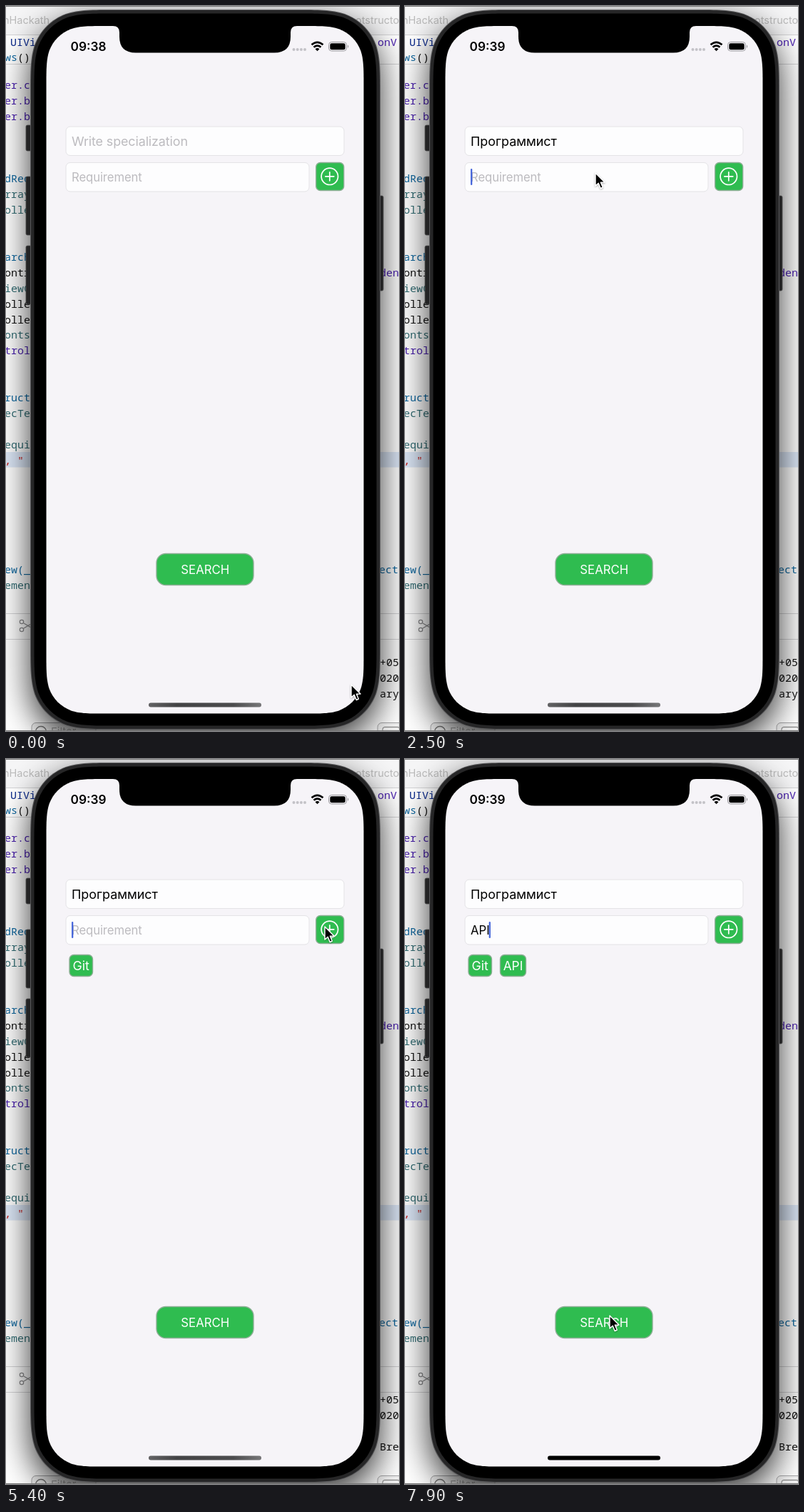
Write an HTML page that moves like this. It is 551x1016 px and loops after 8000 ms.

```html
<!DOCTYPE html>
<html lang="en">
<head>
<meta charset="utf-8">
<title>Phone form demo</title>
<style>
  html, body { margin: 0; width: 100%; height: 100%; overflow: hidden; background: #fff; }
  svg { display: block; width: 551px; height: 1016px; font: 17px Inter, "Noto Sans", sans-serif; }
  text { white-space: pre; }
  .code { font: 500 15px "Noto Sans Mono", "DejaVu Sans Mono", monospace; }
  .hint { fill: #bcbbbf; letter-spacing: -.1px; }
  .field { fill: #fdfdfe; stroke: #e4e3e6; }
  .green { fill: #2fbc50; stroke: #8cae94; stroke-width: 1.4; }
  .white { fill: #fff; }
  .mid { text-anchor: middle; }
  .rule { stroke: #d4d4d6; fill: none; }
  .line { fill: none; stroke-linecap: round; }
</style>
</head>
<body>
<svg viewBox="0 0 551 1016">
  <defs>
    <filter id="blur" x="-30%" y="-30%" width="160%" height="160%"><feGaussianBlur stdDeviation="24"/></filter>
    <filter id="soft" x="-20%" y="-120%" width="140%" height="360%">
      <feDropShadow dx="0" dy="5" stdDeviation="14" flood-opacity=".26"/>
    </filter>
    <filter id="drop" x="-50%" y="-50%" width="200%" height="200%">
      <feDropShadow dx="0" dy="1" stdDeviation="1" flood-opacity=".35"/>
    </filter>
    <linearGradient id="bar"><stop stop-color="#636365"/><stop offset=".25" stop-color="#434345"/>
      <stop offset=".75" stop-color="#4c4c4e"/><stop offset="1" stop-color="#777779"/></linearGradient>
  </defs>

  <!-- editor window -->
  <rect width="551" height="1016" fill="#fff"/>
  <rect width="551" height="40" fill="#f5f5f6"/>
  <rect y="625" width="551" height="21.5" fill="#dde8f8"/>
  <path class="rule" d="M0 40.5H551M0 81.5H551M0 851.5H551M0 887.5H551"/>
  <g fill="none" stroke="#8b8b8d" stroke-width="1.2">
    <circle cx="22" cy="863" r="2.7"/><circle cx="22" cy="874" r="2.7"/>
    <path d="M25 865L35 871M25 872L35 866"/>
  </g>
  <g id="code" class="code"></g>
  <g id="log" class="code"></g>
  <g fill="#f2f2f2" stroke="#a5a5a7">
    <rect x="36" y="1004.5" width="90" height="24" rx="6"/>
    <rect x="521" y="1004.5" width="50" height="24" rx="6"/>
    <circle cx="49" cy="1017" r="7.5" stroke="#777" stroke-width="1.5"/>
    <rect x="528" y="1010.5" width="24" height="14" rx="3" stroke="#777"/>
  </g>
  <text x="63" y="1022" font-size="15" fill="#aaa">Filter</text>

  <!-- phone -->
  <rect x="34" y="22" width="491" height="1009" rx="80" opacity=".8" filter="url(#blur)"/>
  <path stroke="#777" d="M0 .5H551M0 1015.5H551"/>
  <g fill="#232324" stroke="#4a4a4b" stroke-width=".8">
    <rect x="28" y="167" width="8" height="36" rx="2"/>
    <rect x="28" y="239" width="8" height="82" rx="2"/>
    <rect x="28" y="336" width="8" height="82" rx="2"/>
    <rect x="521" y="266" width="8" height="133" rx="2"/>
  </g>
  <g id="body"></g>
  <path d="M150 28Q159 28 159 37V43Q159 65.500 182 65.500H376Q399 65.500 399 43V37Q399 28 408 28V27H150Z"/>
  <text id="clock" x="90.500" y="63" font-weight="600" font-size="17.300"></text>
  <g fill="#c3c2c7">
    <circle cx="403.500" cy="61" r="2"/><circle cx="408.700" cy="61" r="2"/>
    <circle cx="413.900" cy="61" r="2"/><circle cx="419" cy="61" r="2"/>
  </g>
  <path fill="none" stroke="#000" stroke-width="2.7" d="M428.500 54.300Q436.500 47.300 444.500 54.300M431.500 57.700Q436.500 53.500 441.500 57.700"/>
  <path d="M433.500 60.200Q436.500 58 439.500 60.200L436.500 63.300Z"/>
  <rect x="452.500" y="50.500" width="25" height="12.500" rx="4" fill="none" stroke="#9b9a9e"/>
  <rect x="454.300" y="52.300" width="21.400" height="9" rx="2.400"/>
  <path fill="#9b9a9e" d="M479 54.500Q481.500 56.700 479 59Z"/>
  <rect id="home" x="200" y="976.500" width="158" height="6" rx="3"/>

  <!-- form -->
  <rect class="field" x="84" y="169" width="390" height="40.500" rx="6"/>
  <rect class="field" x="84" y="219.500" width="341" height="40.500" rx="6"/>
  <text id="spec" x="92" y="196" font-size="17.900"></text>
  <text id="req" x="92" y="246" font-size="16.700"></text>
  <rect class="green" x="434.700" y="219.500" width="39" height="39" rx="6"/>
  <g class="line" stroke="#fff" stroke-width="1.700">
    <circle cx="453.800" cy="238.800" r="11.700"/><path d="M447.800 238.800H459.800M453.800 232.800V244.800"/>
  </g>
  <rect id="caret" width="2.300" height="23" rx="1" fill="#4868dc"/>
  <g id="git">
    <rect class="green" x="89" y="274.500" width="32.500" height="30" rx="6"/>
    <text class="white mid" x="105.200" y="296" font-size="17.800">Git</text>
  </g>
  <g id="api">
    <rect class="green" x="133.500" y="274.500" width="36" height="30" rx="6"/>
    <text class="white mid" x="151.500" y="296" font-size="17.300">API</text>
  </g>
  <rect class="green" x="211" y="767.500" width="136" height="44" rx="13"/>
  <text class="white mid" x="279.300" y="796" font-size="16.800">SEARCH</text>

  <!-- keyboard language picker -->
  <g id="picker">
    <rect x="120" y="374" width="318" height="205.500" rx="30" fill="#e3e4e7"/>
    <rect x="145.500" y="399.500" width="266.500" height="77" rx="13" fill="#c1c1c3"/>
    <text class="mid" x="278.700" y="446" font-size="22.500" letter-spacing="-.2" fill="#3b3b3d">Russian</text>
    <text class="mid" x="278.700" y="523" font-size="22.500" letter-spacing="-.2" fill="#565659">ABC</text>
  </g>

  <!-- edit menu -->
  <g id="menu">
    <path filter="url(#soft)" fill="#f8f7f9" d="M88 167H395Q408 167 408 180V199Q408 212 395 212H128L120 219Q118.500 220 117 219L109 212H88Q75 212 75 199V180Q75 167 88 167Z"/>
    <path class="rule" d="M155.500 167V212M241.500 167V212M351.500 167V212"/>
    <g class="mid" font-size="16.500">
      <text x="114.700" y="195">Paste</text>
      <text x="198" y="195">Select</text>
      <text x="295.700" y="195">Select All</text>
    </g>
    <path class="line" stroke="#111" stroke-width="1.600" d="M371.500 186V184Q371.500 181.500 374 181.500H376M383 181.500H385Q387.500 181.500 387.500 184V186M387.500 193V195Q387.500 197.500 385 197.500H383M376 197.500H374Q371.500 197.500 371.500 195V193M375 186H384M375 189.500H384M375 193H381"/>
  </g>
  <path id="mouse" filter="url(#drop)" stroke="#fff" stroke-width="1.400" stroke-linejoin="round" d="M0 0V18L4.200 14.300L7.200 21.500L10.300 20.200L7.300 13.100H13Z"/>
</svg>
<script>
const $ = id => document.getElementById(id);
const LOOP = 8000;
const purple = '#4b21b0', blue = '#0f68a0', teal = '#326d74', navy = '#0b2a8c', red = '#c41a16', ink = '#111';

// rounded box whose corners ease gradually into the straight sides
function smoothBox(x, y, w, h, r, color) {
  const half = [[1.529, 0], [1.088, 0], [.868, 0], [.631, .075], [.373, .169]];
  const corner = [...half, ...half.map(([a, b]) => [b, a]).reverse()];
  const place = (right, bottom) => corner.map(([a, b]) =>
    `${right ? x + w - a * r : x + a * r} ${bottom ? y + h - b * r : y + b * r}`);
  const arcs = [place(0, 0), place(0, 1).reverse(), place(1, 1), place(1, 0).reverse()];
  const d = arcs.map(([start, ...rest], i) => `${i ? 'L' : 'M'}${start}C${rest.join(' ')}`).join('');
  return `<path fill="${color}" d="${d}Z"/>`;
}
$('body').innerHTML = smoothBox(34, 5, 491, 1009, 79, '#59595b') + smoothBox(35, 6, 489, 1007, 78, '#262627') +
  smoothBox(39.5, 10.5, 480, 998, 74, '#000') + smoothBox(56.5, 28, 445, 963.5, 55, '#f6f4f8');

const label = (x, y, color, str) => `<text x="${x}" y="${y}" fill="${color}">${str}</text>`;
const row = n => 116 + 21.9 * n;

// [row, color, text] for the left edge of the editor
const lines = [
  [0, purple, 'er.c'], [1, purple, 'er.b'], [2, purple, 'er.b'],
  [6, blue, 'dReq'], [7, teal, 'rray'], [8, teal, 'olle'],
  [11, blue, 'arch'], [12, ink, 'ontr'], [13, teal, 'iewC'], [14, ink, 'olle'],
  [15, ink, 'olle'], [16, teal, 'onts'], [17, purple, 'trol'],
  [20, blue, 'ruct'], [21, teal, 'ecTe'], [23, teal, 'equi'], [24, red, ', "'],
  [31, blue, 'ew(_'], [32, teal, 'emen']
];
$('code').innerHTML = lines.map(([n, color, str]) => label(-2, row(n), color, str)).join('') +
  label(-3, 56, navy, ' UIVi') + label(-2, 77, blue, 'ws<tspan fill="#111">()</tspan>') +
  label(521, 56, purple, 'onV') + label(524, row(12), purple, 'den') + label(523, row(31), blue, 'ect') +
  '<g font-family="Inter, sans-serif" font-size="14.5" font-weight="400">' +
  label(-4, 25, '#bbb', 'nHackath') + label(490, 25, '#bbb', 'otstructo') + '</g>';

const logs = [
  [[925, '+05'], [947, '020'], [969, 'ary']],
  [[903, '+05'], [925, '020'], [969, 'Bre']]
].map(set => set.map(([y, str]) => label(524, y, ink, str)).join(''));

const clamp = v => Math.max(0, Math.min(1, v));
const ramp = (t, a, b) => clamp((t - a) / (b - a));
const pulse = (t, a, b, c, d) => ramp(t, a, b) * (1 - ramp(t, c, d));
const typed = (str, t, a, b) => t < a ? '' : str.slice(0, Math.ceil(ramp(t, a, b) * str.length));

// [time, x, y] of the pointer tip
const path = [
  [100, 484, 951], [900, 316, 188], [2250, 316, 188], [2450, 267, 234], [4400, 267, 234],
  [4900, 447, 235], [6400, 447, 235], [6700, 455, 242], [7150, 455, 242], [7600, 287, 780]
];
function pointer(t) {
  const i = path.findIndex(p => p[0] > t);
  if (i < 1) return (i ? path[path.length - 1] : path[0]).slice(1);
  const [a, ax, ay] = path[i - 1], [b, bx, by] = path[i];
  const u = ramp(t, a, b), k = u * u * (3 - 2 * u);
  return [ax + (bx - ax) * k, ay + (by - ay) * k];
}

// the caret restarts its blink at each focus or edit
const resets = [950, 2300, 4300, 5000, 5900, 6750];
function blink(t) {
  const start = resets.filter(r => r <= t).pop();
  if (start === undefined) return 0;
  const p = (t - start) % 1000;
  return p < 800 ? 1 - ramp(p, 400, 550) : ramp(p, 850, 1000);
}

function fill(el, str, hint) {
  const value = str || hint;
  if (el.textContent !== value) el.textContent = value;
  el.setAttribute('class', str ? '' : 'hint');
}
const show = (id, opacity) => $(id).setAttribute('opacity', opacity);
let logged;

function draw(t) {
  const spec = typed('Программист', t, 1600, 2100);
  const req = t < 5000 ? typed('Git', t, 4000, 4300) : typed('API', t, 5600, 5900);
  fill($('spec'), spec, 'Write specialization');
  fill($('req'), req, 'Requirement');
  $('clock').textContent = t < 2250 ? '09:38' : '09:39';

  const inSpec = t < 2300, active = $(inSpec ? 'spec' : 'req');
  const width = (inSpec ? spec : req) ? active.getComputedTextLength() - 1 : 0;
  $('caret').setAttribute('x', 92 + width);
  $('caret').setAttribute('y', inSpec ? 177.5 : 228);
  show('caret', blink(t));

  show('picker', pulse(t, 1000, 1100, 1550, 1750));
  show('menu', pulse(t, 6050, 6250, 7000, 7200));
  show('git', +(t >= 5000));
  show('api', +(t >= 7000));
  $('home').setAttribute('fill', t < 6000 ? 'url(#bar)' : '#000');
  const log = +(t >= 5000);
  if (log !== logged) $('log').innerHTML = logs[logged = log];
  $('mouse').setAttribute('transform', `translate(${pointer(t)})`);
}

function frame() {
  draw(performance.now() % LOOP);
  requestAnimationFrame(frame);
}
frame();
</script>
</body>
</html>
```
